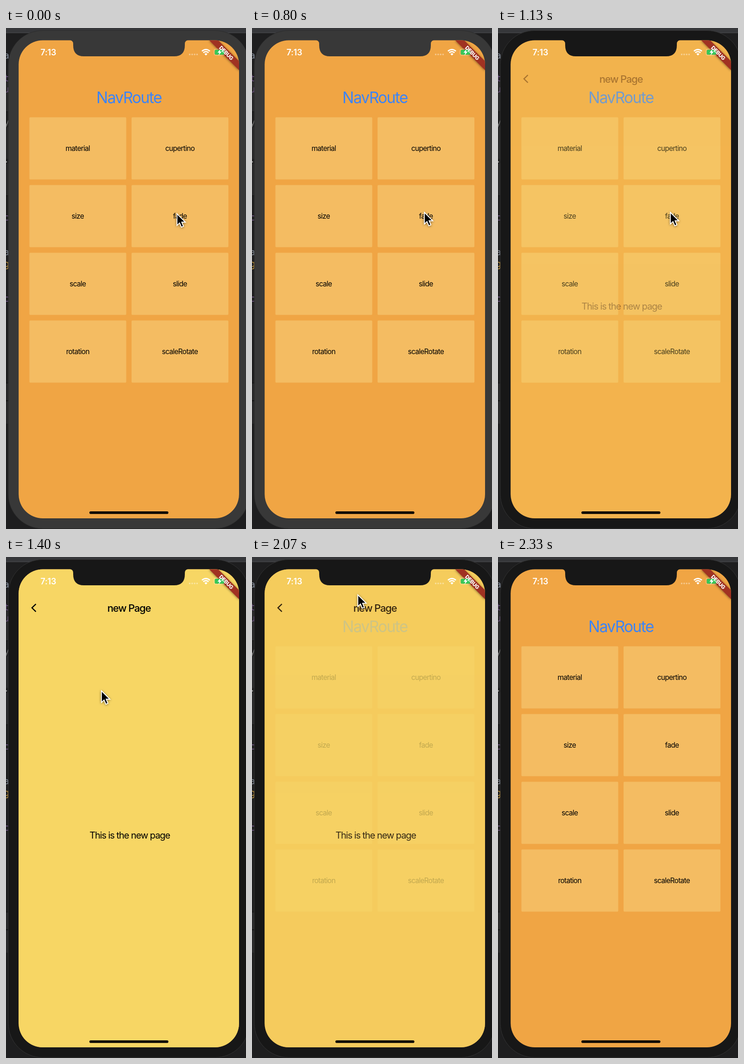
An HTML page that plays this animation: 518x1080 px, repeating every 2.39 s.

```html
<!DOCTYPE html>
<html lang="en">
<head>
<meta charset="utf-8">
<title>Fade route</title>
<style>
html, body { margin: 0; width: 100%; height: 100%; overflow: hidden; background: #1e1e1f; }
svg { display: block; width: 100vw; height: 100vh; }
text { font-family: Inter, "Open Sans", sans-serif; font-optical-sizing: none; }
.mid { text-anchor: middle; }
.label { font-size: 15.5px; letter-spacing: -.73px; }
.code { font: 20px "Noto Sans Mono", monospace; text-anchor: end; }
</style>
</head>
<body>
<svg viewBox="0 0 518 1080">
  <defs>
    <clipPath id="screen"><rect x="27.3" y="26.5" width="475.7" height="1030.5" rx="52"/></clipPath>
    <filter id="soft" x="-50%" y="-50%" width="200%" height="200%">
      <feDropShadow dx="0" dy="1" stdDeviation="2.5" flood-opacity=".5"/>
    </filter>
  </defs>

  <!-- editor behind the phone -->
  <rect width="518" height="1080" fill="#1e1e1f"/>
  <g fill="#29292a">
    <path d="M0 116h8v64H0zM0 214h8v68H0zM0 292h8v69H0zM0 766h8v36H0zM0 805h8v48H0z"/>
  </g>
  <path d="M0 180.5h8M0 361.5h8M0 765.5h8M0 803.5h8" stroke="#111"/>
  <rect width="518" height="10" fill="#36373a"/>
  <path d="M0 10.5H518" stroke="#4a4b4e"/>
  <g id="code"></g>

  <rect id="body" x="5" y="5.5" width="520" height="1073.5" rx="74"/>

  <g clip-path="url(#screen)">
    <rect x="27" y="26" width="477" height="1032" fill="#f0a544"/>
    <text class="mid" x="265.3" y="161.5" font-size="33.5" letter-spacing="-1.65" fill="#3d84f7">NavRoute</text>
    <g id="cells"></g>

    <g id="page">
      <rect x="27" y="26" width="477" height="1032" fill="#f7d664"/>
      <path d="M64.5 101.3L56 109.6L64.5 117.9" fill="none" stroke="#000" stroke-width="2.4"/>
      <text class="mid" x="265.5" y="117.5" font-size="22" font-weight="500" letter-spacing="-1.2">new Page</text>
      <text class="mid" x="267" y="607" font-size="20" letter-spacing="-1.07">This is the new page</text>
    </g>

    <path d="M438 26L503.5 91.5V72L457.5 26z" fill="#a03220" filter="url(#soft)"/>

    <!-- status bar -->
    <g fill="#fff">
      <text x="74.5" y="59" font-size="18" font-weight="600" letter-spacing="-.2">7:13</text>
      <g opacity=".4">
        <circle cx="396.5" cy="57" r="1.8"/><circle cx="401.8" cy="57" r="1.8"/>
        <circle cx="407.1" cy="57" r="1.8"/><circle cx="412.4" cy="57" r="1.8"/>
      </g>
      <path d="M431.5 59.3L428.3 56Q431.5 53.2 434.7 56z"/>
      <path d="M425.8 53.3Q431.5 48.4 437.2 53.3M422.9 50Q431.5 42.6 440.1 50" fill="none" stroke="#fff" stroke-width="2.7"/>
      <rect x="448.9" y="45.4" width="23.6" height="13.6" rx="4" fill="none" stroke="#fff" stroke-opacity=".4"/>
      <rect x="450.5" y="47" width="20.4" height="10.4" rx="2.5" fill="#35c759"/>
      <path d="M463.5 44.5L456.5 53.2H460.5L458.5 59.5L465.5 50.8H461.5z"/>
      <text class="mid" transform="translate(475.5 53.7) rotate(45)" y="4.2" font-size="11.3" font-weight="800" letter-spacing="-.3">DEBUG</text>
    </g>
    <rect x="180" y="1042" width="170.5" height="5.6" rx="2.8"/>
  </g>
  <path id="notch" d="M136 25.5Q145 26.5 145 34V37Q145 61 168 61H363Q386 61 386 37V34Q386 26.5 395 25.5z"/>

  <path id="cursor" d="M1 1.5V26.5L6.7 21.2L10.6 30.3L15 28.4L11.2 19.5H19.2z" fill="#000" stroke="#fff" stroke-width="1.8" filter="url(#soft)"/>
</svg>
<script>
const LOOP = 2390, STEP = 200 / 3;
const $ = id => document.getElementById(id);

const names = ["material", "cupertino", "size", "fade", "scale", "slide", "rotation", "scaleRotate"];
$("cells").innerHTML = names.map((name, i) => {
  const x = 50.5 + i % 2 * 220.5, y = 192.4 + (i >> 1) * 146;
  return `<rect x="${x}" y="${y}" width="209" height="134" rx="2" fill="#f4bc62"/>
    <text class="mid label" x="${x + 104.3}" y="${y + 72.3}">${name}</text>`;
}).join("");

const glyphs = [["a", 66, "#8a93a0"], ["t", 115, "#75598a"], ["u", 139, "#75598a"],
  ["y", 210, "#777"], [".", 290, "#aaa"], ["c", 415, "#75598a"],
  ["a", 490, "#8a93a0"], ["g", 515, "#c79a3e"], ["c", 590, "#75598a"]];
$("code").innerHTML = glyphs.map(([c, y, fill]) =>
  `<text class="code" x="7" y="${y}" fill="${fill}">${c}</text>`).join("");

// cursor path: time, x, y
const path = [[0, 368, 399], [530, 368, 399], [600, 371, 396], [1200, 371, 396], [1400, 205, 287],
  [1600, 62, 114], [1970, 62, 110], [2067, 228, 80], [2133, 396, -8], [2200, 560, -100], [2400, 560, -100]];

function cursorAt(t) {
  const i = path.findIndex(p => p[0] > t);
  const [t0, x0, y0] = path[i - 1], [t1, x1, y1] = path[i];
  const k = (t - t0) / (t1 - t0);
  return [x0 + (x1 - x0) * k, y0 + (y1 - y0) * k];
}

// cubic-bezier(.4, 0, .2, 1), solved by bisection
function ease(x) {
  if (x <= 0) return 0;
  if (x >= 1) return 1;
  let lo = 0, hi = 1, s;
  for (let i = 0; i < 20; i++) {
    s = (lo + hi) / 2;
    const r = 1 - s;
    if (1.2 * s * r * r + .6 * s * s * r + s ** 3 < x) lo = s; else hi = s;
  }
  return s * s * (3 - 2 * s);
}

function draw(now) {
  const t = Math.floor((now % LOOP + 5) / STEP) * STEP;
  const shown = t < 1500 ? (t - 1052) / 300 : 1 - (t - 1948) / 240;
  $("page").setAttribute("opacity", ease(shown));

  const dark = t > 930, shade = dark ? "#171717" : "#383838";
  $("body").setAttribute("fill", shade);
  $("body").setAttribute("stroke", dark ? "#333" : "#2c2c2c");
  $("notch").setAttribute("fill", shade);

  $("cursor").setAttribute("transform", `translate(${cursorAt(t)})`);
  requestAnimationFrame(draw);
}
requestAnimationFrame(draw);
</script>
</body>
</html>
```
